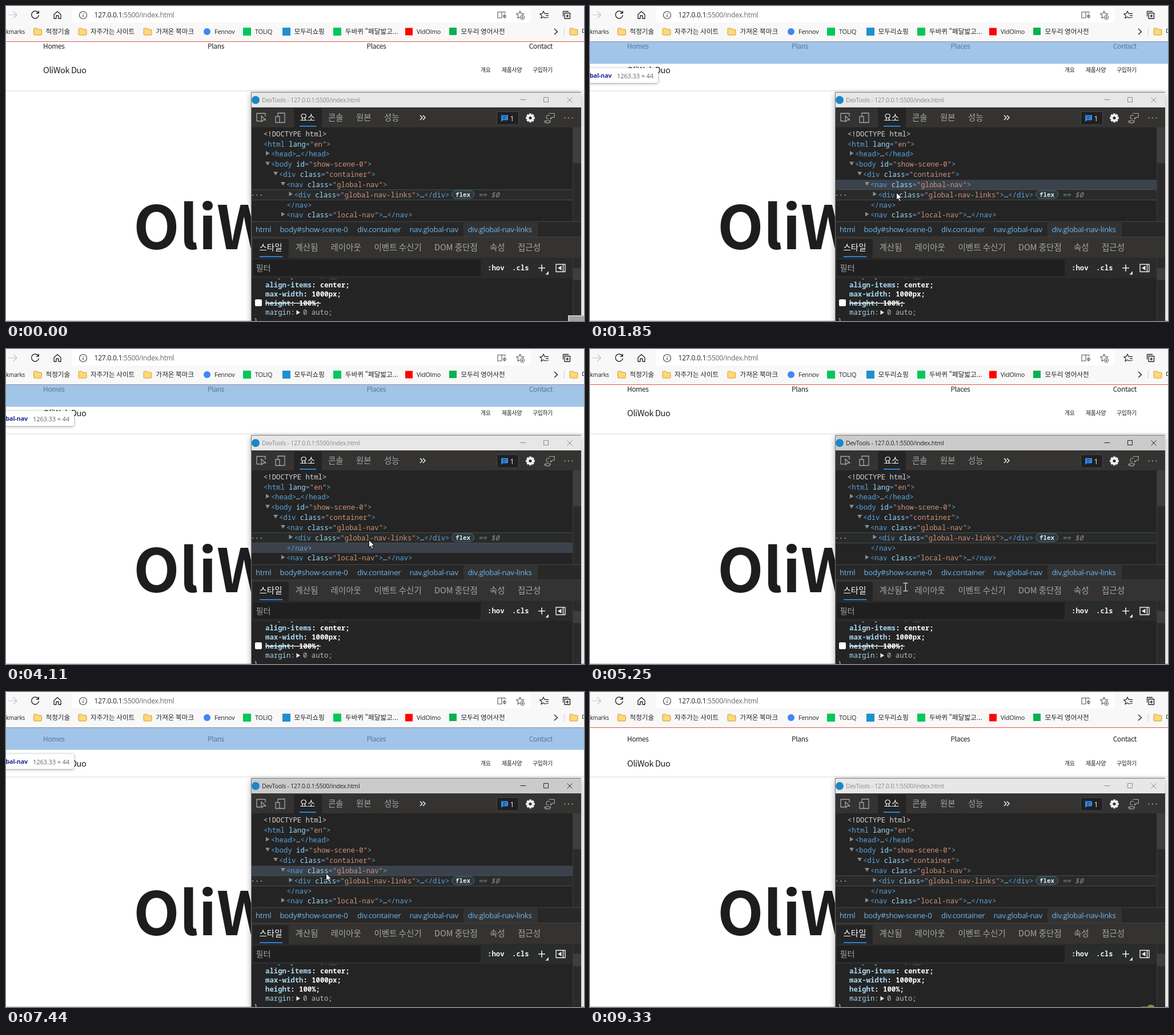
Write an HTML page with a canvas that moves like this. It is 1012x553 px and loops after 9390 ms.

```html
<!DOCTYPE html>
<html lang="ko">
<head>
<meta charset="utf-8">
<title>Nav inspection</title>
<style>
html, body { margin: 0; width: 100%; height: 100%; overflow: hidden; background: #fff; }
canvas { display: block; }
</style>
</head>
<body>
<canvas id="stage" width="1012" height="553"></canvas>
<script>
const ctx = document.getElementById('stage').getContext('2d');
const LOOP = 9390;
const UI = '"Open Sans", "Noto Sans CJK KR", sans-serif';
const KR = '"Noto Sans CJK KR", "Noto Sans CJK", sans-serif';
const MONO = '"Noto Sans Mono", "DejaVu Sans Mono", monospace';
const BLUE = 'rgba(111,168,220,.66)', ORANGE = 'rgba(246,178,107,.66)';
const PANE = '#242424', BAR = '#343332', TRACK = '#2b2b2b', THUMB = '#3e3e3e', ACCENT = '#2f80d6';

// Each move is a list of [time, x, y]; the pointer rests after its last point.
const moves = [
  [[520, 960, 540], [590, 850, 440], [660, 740, 368], [730, 640, 340]],
  [[1540, 620, 339], [1850, 536, 327], [2070, 560, 333]],
  [[2340, 552, 322], [2410, 546, 316]],
  [[2940, 575, 320], [3070, 647, 331], [3140, 668, 332]],
  [[3340, 660, 330], [3620, 600, 318], [3900, 610, 340], [4110, 635, 335], [4240, 634, 332], [4310, 638, 331]],
  [[4900, 630, 338], [5110, 590, 385], [5400, 510, 455], [5600, 470, 495], [5790, 439, 521], [5990, 439, 520]],
  [[6710, 470, 465], [6780, 512, 415], [6850, 540, 362], [6920, 555, 325]],
  [[7440, 560, 318], [7580, 572, 312]],
  [[7790, 590, 325], [7850, 600, 333]],
  [[8210, 612, 375], [8260, 617, 426], [8330, 570, 470], [8460, 440, 517]],
  [[8790, 500, 521], [9130, 970, 560]]
];
const hovers = [
  [660, 'end'], [1540, 'links'], [1720, 'nav'], [1980, 'links'], [2340, 'nav'],
  [3140, 'links'], [3480, 'nav'], [3620, 'links'], [3960, 'end'], [4180, 'links'],
  [4970, 'end'], [5040, 'local'], [5110, ''], [6850, 'end'], [6920, 'links'],
  [7440, 'nav'], [7790, 'links'], [8210, 'end'], [8330, '']
];
const rowY = { nav: 305, links: 323, end: 340, local: 358 };

const tree = [
  ['<!DOCTYPE html>', 451, 224.5, ''],
  ['<html lang="en">', 451, 242.5, ''],
  ['<head>…</head>', 464, 260, 'r'],
  ['<body id="show-scene-0">', 464, 278, 'd'],
  ['<div class="container">', 478, 295.5, 'd'],
  ['<nav class="global-nav">', 491, 313.5, 'd'],
  ['<div class="global-nav-links">…</div>', 504.5, 331.5, 'r'],
  ['</nav>', 491.5, 349.5, ''],
  ['<nav class="local-nav">…</nav>', 491, 367, 'r']
];

function rect(x, y, w, h, fill) {
  ctx.fillStyle = fill;
  ctx.fillRect(x, y, w, h);
}

function round(x, y, w, h, r, fill, stroke) {
  ctx.beginPath();
  ctx.roundRect(x, y, w, h, r);
  if (fill) { ctx.fillStyle = fill; ctx.fill(); }
  if (stroke) { ctx.strokeStyle = stroke; ctx.lineWidth = 1; ctx.stroke(); }
}

function disc(x, y, r, fill) {
  ctx.beginPath();
  ctx.arc(x, y, r, 0, 7);
  ctx.fillStyle = fill;
  ctx.fill();
}

// Line icon from SVG path data, placed relative to its centre.
function icon(x, y, d, stroke, width = 1.2, fill) {
  ctx.save();
  ctx.translate(x, y);
  const p = new Path2D(d);
  if (fill) { ctx.fillStyle = fill; ctx.fill(p); }
  if (stroke) {
    ctx.strokeStyle = stroke;
    ctx.lineWidth = width;
    ctx.lineJoin = 'round';
    ctx.stroke(p);
  }
  ctx.restore();
}

// Text centred vertically on cy; returns its advance.
function text(s, x, cy, size, color, o = {}) {
  ctx.font = `${o.style || ''} ${o.weight || 400} ${size}px ${o.font || UI}`;
  ctx.letterSpacing = (o.space || 0) * size + 'px';
  ctx.textAlign = o.align || 'left';
  ctx.fillStyle = color;
  ctx.fillText(s, x, cy + size * .36);
  return ctx.measureText(s).width;
}
const ui = (s, x, cy, size, color, o) => text(s, x, cy, size, color, { space: -.018, ...o });
const kr = (s, x, cy, size, color, o) => text(s, x, cy, size, color, { font: KR, ...o });
const mono = (s, x, cy, size, color, o) => text(s, x, cy, size, color, { font: MONO, ...o });

function folder(x) {
  icon(x, 39, 'M0 1.5 Q0 0 1.5 0 H5.5 L7.5 2 H12.5 Q14 2 14 3.5 V10.5 Q14 12 12.5 12 H1.5 Q0 12 0 10.5Z', '#d09a2c', 1, '#ffd877');
}

function browser() {
  rect(0, 0, 1012, 62, '#f8f8f8');
  round(115, 2, 803, 27, 4, '#fff');
  icon(12, 15.5, 'M-8 0 H7 M1 -6 L7 0 L1 6', '#c4c4c4');
  icon(51, 15.5, 'M5.8 -3 A6.4 6.4 0 1 0 6.4 0.6 M6.3 -7 V-2.7 H2', '#222', 1.4);
  icon(90, 15.5, 'M-6 -0.5 L0 -6 L6 -0.5 V6.5 H2 V1.5 H-2 V6.5 H-6Z', '#222', 1.3);
  icon(135, 16, 'M6.5 0 A6.5 6.5 0 1 1 -6.5 0 A6.5 6.5 0 1 1 6.5 0 M0 -1 V3.5 M0 -3.6 V-2.2', '#444');
  const ip = ui('127.0.0.1', 154.5, 16, 12, '#222');
  ui(':5500/index.html', 154.5 + ip, 16, 12, '#666');
  icon(868, 16, 'M0 5 V-5.5 H-7 V5 H0 M0 -5.5 H6 V-3 M3 1 L5 -1 V5 L3 3Z M6.5 -.5 Q8 2 6.5 4.5', '#555', 1.1);
  const star = 'M0 -6.5 L2 -2.2 L6.5 -1.7 L3.2 1.4 L4 6 L0 3.7 L-4 6 L-3.2 1.4 L-6.5 -1.7 L-2 -2.2Z';
  icon(900, 15.5, star, '#555', 1.1);
  disc(904, 20, 4.5, '#fff');
  icon(904, 20, 'M3.6 0 A3.6 3.6 0 1 1 -3.6 0 A3.6 3.6 0 1 1 3.6 0 M-2 0 H2 M0 -2 V2', '#555', 1);
  icon(942, 15.5, 'M3 6 L-1 3.6 L-5 6 L-4 1.4 L-7.4 -1.7 L-3 -2.2 L-1 -6.5 L1 -2.2 H8 M3 1.2 H8 M3 4.5 H8', '#222');
  icon(982, 15.5, 'M-4 -3 H5.5 V6.5 H-4Z M-6.5 3 V-6 H3 M.8 -.5 V4.5 M-1.7 2 H3.3', '#222', 1.3);

  ui('kmarks', 0, 45, 10, '#222');
  [48.5, 127, 241, 987].forEach(folder);
  const label = (s, x) => kr(s, x, 44.5, 11.6, '#222');
  label('적정기술', 69.5);
  label('자주가는 사이트', 148);
  label('가져온 북마크', 262.5);
  disc(352, 45, 6, '#4285f4');
  ui('Fennov', 365, 45, 10.8, '#222');
  rect(415, 38, 14, 14, '#03c75a');
  ui('TOLIQ', 436, 45, 10.8, '#222');
  rect(484, 38, 14, 14, '#1f8fce');
  label('모두리쇼핑', 504.5);
  rect(573, 38, 14, 14, '#03c75a');
  label('두바퀴 "페달밟고...', 594);
  rect(699, 38.5, 13, 13, '#f00');
  ui('VidOlmo', 719, 45, 10.8, '#222');
  rect(776, 38, 13, 13, '#09b14f');
  label('모두리 영어사전', 796.5);
  icon(963, 45, 'M-3 -5 L2.5 0 L-3 5', '#222', 1.4);
  rect(977, 38, 1, 14, '#ccc');
  label('다', 1008);
}

function page(tall) {
  rect(0, 62, 1012, 491, '#fff');
  const ink = '#1d1d1f', dy = tall ? 12.5 : 0;
  const link = (s, x, align) => kr(s, x, 70.5 + dy, 12, ink, { space: -.03, align });
  link('Homes', 65);
  link('Plans', 353);
  link('Places', 631.5);
  link('Contact', 957, 'right');
  kr('OliWok Duo', 65, 113 + dy + tall * .5, 14.6, ink, { space: -.03 });
  [['개요', 831], ['제품사양', 868], ['구입하기', 922]].forEach(([s, x]) =>
    kr(s, x, 112 + dy + tall * 1.3, 9.8, ink, { space: -.03 }));
  rect(0, 148.5, 1012, 1, '#d9d9d9');
  kr('OliWok Duo', 223, 389.2, 105, ink, { weight: 900 });
  rect(0, 552, 1012, 1, '#c4c4c4');
  rect(0, 62, 1012, 1, '#e8524a');
}

function tip(x, y, right, name, dims, labelEnd) {
  ctx.save();
  ctx.shadowColor = 'rgba(0,0,0,.4)';
  ctx.shadowBlur = 5;
  ctx.shadowOffsetY = 1;
  round(x, y, right - x, 26, 3, '#fff');
  ctx.restore();
  ui(name, labelEnd, y + 13.5, 10.8, '#1f2a9c', { weight: 700, align: 'right' });
  ui(dims, labelEnd + 9, y + 13.5, 11.2, '#666');
}

function overlay(kind, tall) {
  if (kind === 'nav' || kind === 'end') {
    rect(0, 62, 1012, 39.5, BLUE);
    tip(-40, 109, 119, 'nav.global-nav', '1263.33 × 44', 38);
  } else if (kind === 'links') {
    const h = tall ? 39.5 : 17;
    rect(0, 62, 65, h, ORANGE);
    rect(65, 62, 892, h, BLUE);
    rect(957, 62, 55, h, ORANGE);
    tip(65, 70 + h, 253, 'div.global-nav-links', '1000 × ' + (tall ? 44 : 19), 189);
  } else if (kind === 'local') {
    rect(0, 102.5, 1012, 45.5, BLUE);
    rect(0, 148, 1012, 1, 'rgba(255,229,153,.66)');
    tip(-40, 70, 110, 'nav.local-nav', '1263.33 × 52', 29.5);
  }
}

function markup(s, x, cy) {
  for (const part of s.match(/<!.*|<\/?\w+|>|\w+(?==)|=|"[^"]*"|…| /g)) {
    const color = part[1] === '!' || part === '…' ? '#d4d4d4'
      : part[0] === '"' ? '#ce9178'
      : /^\w/.test(part) ? '#9cdcfe' : '#5ba3dc';
    x += mono(part, x, cy, 12.25, color);
  }
}

function frameAndTabs(active) {
  ctx.save();
  ctx.shadowColor = 'rgba(0,0,0,.32)';
  ctx.shadowBlur = 10;
  ctx.shadowOffsetY = 3;
  rect(429, 151, 578, 410, PANE);
  ctx.restore();
  rect(430, 152, 577, 26, active ? '#cbcbcb' : '#e7e7e7');
  rect(429, 151, 578, 1, '#777');
  rect(429, 151, 1, 402, '#777');
  disc(437, 165, 7, '#1d86c6');
  const ink = active ? '#222' : '#8a8a8a';
  ui('DevTools - 127.0.0.1:5500/index.html', 448, 165, 10.4, ink);
  icon(905.5, 164.5, 'M-5 0 H5', ink, 1);
  icon(945.5, 164.5, 'M-4 -4 H4 V4 H-4Z', ink, 1);
  icon(987, 165, 'M-4.5 -4.5 L4.5 4.5 M4.5 -4.5 L-4.5 4.5', ink, 1);

  rect(430, 178, 577, 35, BAR);
  rect(504, 180, 49, 33, PANE);
  rect(514, 210, 29, 2, ACCENT);
  icon(447, 196, 'M-1 6 H-8 V-7.5 H7 V-2 M0 -3 L8 4 H3.5 L0.5 7.5Z', '#a8a8a8', 1.3);
  icon(480, 196, 'M-4 -3 V-8 H8 V8.5 H-1 M-8 -2 H-1 V8.5 H-8Z', '#a8a8a8', 1.3);
  kr('요소', 514.5, 195.5, 14.5, '#fff');
  [['콘솔', 564], ['원본', 613], ['성능', 662]].forEach(([s, x]) => kr(s, x, 195.5, 14.5, '#a6a6a6'));
  icon(729.5, 196, 'M-4.5 -4 L-.5 0 L-4.5 4 M.5 -4 L4.5 0 L.5 4', '#eee', 1.6);
  round(859.5, 185.5, 38, 23, 2, '#202020', '#484848');
  icon(873, 196.5, 'M-6 -5 H6 V4 H-2.5 L-6 6.5Z', null, 0, '#2f8be6');
  rect(870, 194, 6, 1, '#202020');
  rect(870, 197, 4, 1, '#202020');
  ui('1', 882.5, 197.5, 12.5, '#eee');
  ctx.save();
  ctx.translate(918, 196.5);
  for (let i = 0; i < 4; i++) {
    rect(-2, -7.8, 4, 15.6, '#f2f2f2');
    ctx.rotate(Math.PI / 4);
  }
  ctx.restore();
  disc(918, 196.5, 6, '#f2f2f2');
  disc(918, 196.5, 2.6, BAR);
  icon(951.5, 196.5, 'M0 -4 A3.5 3.5 0 1 0 -1 2 M-8 8.5 V5 H2 Q1 9 -3 9 Q-7 9 -8 5 M-1 -8 H8.5 V-1 H5 L2 2 V-1', '#a8a8a8', 1.2);
  [978.5, 985, 991.5].forEach(x => disc(x, 196.5, 1.1, '#aaa'));
}

function elements(hover) {
  rect(430, 213, 577, 165, PANE);
  rect(430, 322, 562, 19, '#292a2a');
  if (hover) rect(430, rowY[hover], 562, 18, hover === 'links' ? '#303539' : '#3b424c');
  rect(430, 322, 562, 1, '#484c4d');
  rect(430, 340, 562, 1, '#484c4d');
  for (const [s, x, cy, arrow] of tree) {
    if (arrow) icon(x - 6, cy - 1.5, arrow === 'r' ? 'M-3 -4 L3.5 0 L-3 4Z' : 'M-4 -3 L4 -3 L0 3.5Z', null, 0, '#8c8c8c');
    markup(s, x, cy);
  }
  [432, 439.5, 447].forEach(x => disc(x, 332, 1.1, '#aaa'));
  round(780.5, 324, 39, 14, 7, '#2b3a41', '#4c6e7b');
  mono('flex', 787, 331.5, 10.8, '#e6e6e6', { weight: 600 });
  mono('== $0', 827, 331.5, 12.25, '#8e8e8e', { style: 'italic' });
  rect(992, 213, 15, 165, TRACK);
  rect(992, 213, 15, 63, THUMB);
  rect(992, 213, 1, 165, '#3a3a3a');

  rect(430, 378, 577, 28, '#282828');
  rect(430, 378, 577, 1, '#454545');
  rect(801, 380, 130, 25, '#333');
  [['html', 437], ['body#show-scene-0', 479.5], ['div.container', 615], ['nav.global-nav', 706.5], ['div.global-nav-links', 808.5]]
    .forEach(([s, x]) => ui(s, x, 392.5, 13.2, '#6fb7ee'));
}

function checkbox(cy, on) {
  round(436, cy - 6, 12, 12, 2, on ? '#1673d8' : '#fff');
  if (on) icon(442, cy, 'M-3.2 0 L-1 2.5 L3.5 -2.5', '#fff', 1.6);
}

function styles(enabled, hovered) {
  rect(430, 406, 577, 37, BAR);
  rect(430, 405, 577, 1, '#404040');
  rect(432, 409, 63, 33, PANE);
  rect(444, 439, 40, 2, ACCENT);
  kr('스타일', 443.5, 424, 14.5, '#fff');
  [['계산됨', 506.5], ['레이아웃', 568.5], ['이벤트 수신기', 644.5], ['DOM 중단점', 750], ['속성', 847], ['접근성', 896]]
    .forEach(([s, x]) => kr(s, x, 424, 14.5, '#a6a6a6'));

  rect(430, 442, 577, 111, PANE);
  rect(430, 442, 577, 36, '#2a2b2b');
  rect(433, 445, 398, 29, '#1f1f1f');
  kr('필터', 437.5, 459.5, 14.2, '#a0a0a0');
  mono(':hov', 843, 460, 12.3, '#f0f0f0', { weight: 700 });
  mono('.cls', 886, 460, 12.3, '#f0f0f0', { weight: 700 });
  icon(938, 460, 'M-6 0 H6 M0 -6 V6', '#f0f0f0', 1.6);
  icon(947.5, 468.5, 'M2.5 -3 V3 H-3Z', null, 0, '#eee');
  icon(971, 460, 'M-8 -6.5 H8 V6.5 H-8Z M4.5 -6.5 V6.5', '#eee', 1.4);
  icon(969.5, 460, 'M3 -4 V4 L-3.5 0Z', null, 0, '#eee');

  rect(992, 443, 15, 110, TRACK);
  rect(992, 460, 15, 21, THUMB);
  rect(992, 443, 1, 110, '#3a3a3a');
  ctx.save();
  ctx.beginPath();
  ctx.rect(430, 478.5, 562, 75);
  ctx.clip();
  const bold = { weight: 600 };
  const rule = (prop, value, cy) => {
    const w = mono(prop, 454, cy, 12.3, '#a9d6ee', bold);
    mono(': ' + value + ';', 454 + w, cy, 12.3, '#fff', bold);
  };
  rule('display', 'flex', 473);
  round(564.5, 466, 16, 13, 3, '#333', '#666');
  rule('align-items', 'center', 489.5);
  rule('max-width', '1000px', 505.5);
  rule('height', '100%', 521.5);
  if (!enabled) rect(454, 521, 97, 1.3, '#fff');
  const m = mono('margin', 454, 537.5, 12.3, '#a9d6ee');
  mono(':', 454 + m, 537.5, 12.3, '#ccc');
  icon(511.5, 538, 'M-3 -4 L3.5 0 L-3 4Z', null, 0, '#eee');
  mono('0 auto;', 520, 537.5, 12.3, '#b8b8b8');
  mono('}', 434, 552.5, 12.3, '#ddd');
  if (hovered) [473, 489, 505, 537].forEach(y => checkbox(y, true));
  if (hovered || !enabled) checkbox(521, enabled);
  ctx.restore();
}

function pointerAt(t) {
  const run = moves.filter(m => m[0][0] <= t).pop();
  if (!run) return null;
  const i = run.findLastIndex(k => k[0] <= t);
  const a = run[i], b = run[i + 1];
  if (!b) return { x: a[1], y: a[2] };
  const u = Math.floor((t - a[0]) / 68) * 68 / (b[0] - a[0]);
  return { x: a[1] + (b[1] - a[1]) * u, y: a[2] + (b[2] - a[2]) * u };
}

function pointer({ x, y }, t) {
  let kind = 'arrow';
  if (y >= 480) kind = x < 450 ? 'hand' : 'beam';
  else if (y >= 443 || (y >= 406 && t < 8000)) kind = 'beam';
  else if (y >= 378) kind = 'hand';
  if (kind === 'arrow') {
    icon(x, y, 'M.5 .5 V13.5 L3.4 10.8 L5.8 16 L8 15 L5.7 10 H10Z', '#111', 1, '#fff');
  } else if (kind === 'beam') {
    icon(x, y, 'M-4 -7 H-1 Q0 -7 0 -6 Q0 -7 1 -7 H4 M0 -6 V6 M-4 7 H-1 Q0 7 0 6 Q0 7 1 7 H4', '#e4e4e4', 1.2);
  } else {
    icon(x, y, 'M-1.5 1.5 Q0 -1 1.5 1.5 V6 L8 7.5 Q9.5 8 9.3 10 L8 17.5 H-.5 L-4.5 11.5 Q-5.5 9.5 -3.5 9.7 L-1.5 11.3Z', '#111', 1, '#fff');
    icon(x, y, 'M3.5 7 V9.5 M6 7.5 V10', '#111', .8);
  }
}

function draw(t) {
  const enabled = t >= 6130;
  const active = t >= 4570 && t < 9330;
  const hover = (hovers.filter(h => h[0] <= t).pop() || [0, ''])[1];
  const pos = pointerAt(t);
  const inRule = !!pos && pos.y >= 480 && pos.y < 553 && t > 4900;
  page(enabled ? 1 : 0);
  overlay(t >= 8260 && t < 8330 ? 'local' : hover, enabled);
  browser();
  frameAndTabs(active);
  elements(hover);
  styles(enabled, inRule);
  if (t < 70) {
    rect(984, 543, 28, 10, '#c6c6c6');
    rect(986, 545, 26, 8, '#a3a3a3');
  }
  if (t >= 9330) disc(982, 557, 8, '#8f8a3c');
  if (pos) pointer(pos, t);
}

const start = performance.now();
function tick() {
  draw((performance.now() - start) % LOOP);
  requestAnimationFrame(tick);
}
tick();
</script>
</body>
</html>
```
